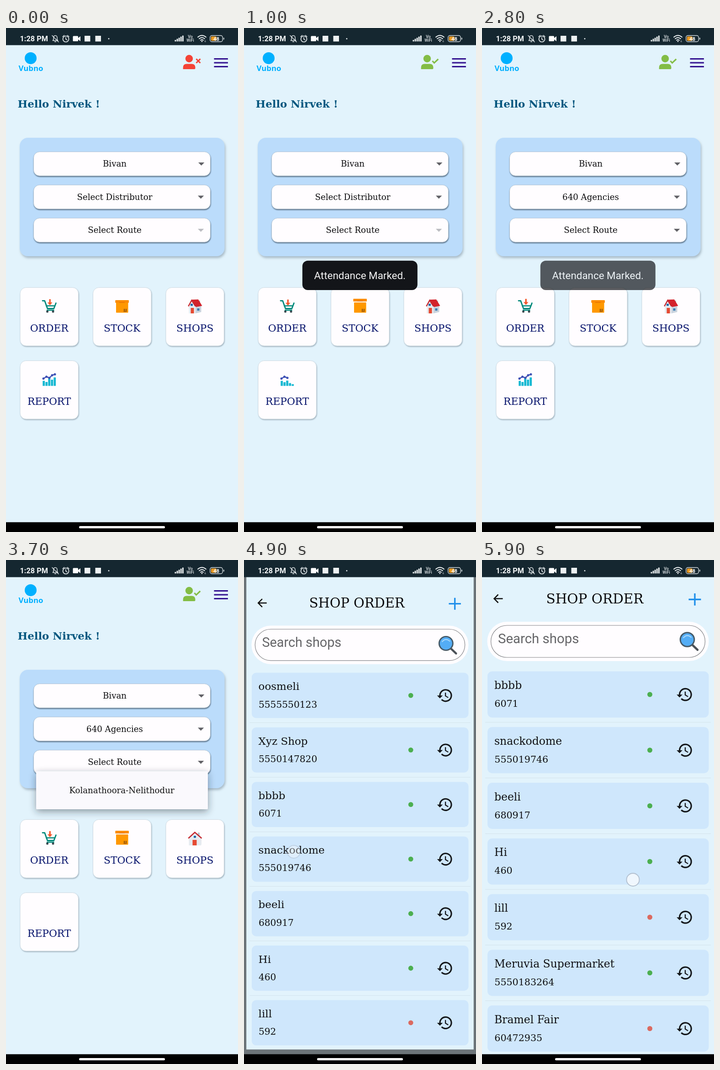
These frames come from a looping animation (508x1102 px, 6 s). An HTML page:

```html
<!DOCTYPE html>
<html lang="en">
<head>
<meta charset="utf-8">
<title>Shop order app</title>
<style>
  html, body { margin: 0; width: 100%; height: 100%; overflow: hidden; background: #e2f3fc; }
  svg { display: block; width: 508px; height: 1102px; }
  text { font-family: "DejaVu Serif", serif; }
  .sans { font-family: Roboto, sans-serif; }
  .mid { text-anchor: middle; }
  .line { fill: none; stroke-linecap: round; stroke-linejoin: round; }
  .sharp { stroke-linecap: butt; stroke-linejoin: miter; }
</style>
</head>
<body>
<svg id="stage" viewBox="0 0 508 1102" xmlns="http://www.w3.org/2000/svg"></svg>
<script>
const LOOP = 6000, STEP = 100, ICON_LOOP = 1500;
const ROUTE = 'Kolanathoora-Nelithodur', AGENCY = '640 Agencies';
const ROW_PITCH = 121.75, FIRST_ROW = 290.8, SCROLL = 240.3;
const PAGE_START = 4783, PAGE_TIME = 300, PAGE_END = 1081;

const shops = [
  ['oosmeli', '5555550123', 1], ['Xyz Shop', '5550147820', 1], ['bbbb', '6071', 1],
  ['snackodome', '555019746', 1], ['beeli', '680917', 1], ['Hi', '460', 1],
  ['lill', '592', 0], ['Meruvia Supermarket', '5550183264', 1], ['Bramel Fair', '60472935', 0]
];
const menus = [
  { top: 390, label: AGENCY, open: 1882, close: 2480 },
  { top: 462, label: ROUTE, open: 3430, close: 4080 }
];
// start, end, x, y
const taps = [
  [400, 570, 407, 76], [1700, 1930, 397, 377], [2300, 2450, 262, 434],
  [3260, 3420, 385, 446], [3920, 4060, 262, 506], [4610, 4800, 109, 638]
];
const drag = { from: 5400, move: 5450, to: 5880 };

const clamp = v => Math.max(0, Math.min(1, v));
const ramp = (t, a, b) => clamp((t - a) / (b - a));
const smooth = v => v * v * (3 - 2 * v);
const lerp = (a, b, k) => a + (b - a) * k;
const zoomAbout = s => `translate(254 551) scale(${s}) translate(-254 -551)`;

const rect = (x, y, w, h, r, fill, more = '') =>
  `<rect x="${x}" y="${y}" width="${w}" height="${h}" rx="${r}" fill="${fill}" ${more}/>`;
const circle = (x, y, r, fill, more = '') =>
  `<circle cx="${x}" cy="${y}" r="${r}" fill="${fill}" ${more}/>`;
const path = (d, fill, more = '') => `<path d="${d}" fill="${fill}" ${more}/>`;
const line = (d, color, w, cls = '') =>
  `<path class="line ${cls}" d="${d}" stroke="${color}" stroke-width="${w}"/>`;
const text = (s, x, y, size, fill, cls = '', more = '') =>
  `<text x="${x}" y="${y}" font-size="${size}" fill="${fill}" class="${cls}" ${more}>${s}</text>`;

const shadow = (id, dx, dy, blur, color, alpha) =>
  `<filter id="${id}" x="-20%" y="-40%" width="140%" height="200%">
    <feDropShadow dx="${dx}" dy="${dy}" stdDeviation="${blur}" flood-color="${color}" flood-opacity="${alpha}"/>
  </filter>`;

function field(i, label) {
  const y = 270.7 + i * 72.5, x = i ? 420 : 421;
  return rect(60.5, y, 387, 52.5, 13, '#fffdff', 'filter="url(#fieldShade)" stroke="#9fb3c4" stroke-width=".7"') +
    text(label, 238, y + 32.3, 18.2, '#0c0c0e', 'mid', `id="field${i}"`) +
    path(`M${x} ${y + 23.3}h13.4l-6.7 6.7z`, '#616166', `id="caret${i}"`);
}

function card(x, y, label) {
  return rect(x, y, 127.5, 127.5, 13, '#fffdff', 'filter="url(#cardShade)" stroke="#c3d2da" stroke-width=".7"') +
    text(label, x + 63.7, y + 96.8, 21.8, '#05126b', 'mid');
}

const cart = line('M80 596.3h4.6l6.2 17.2h14l4.6-12', '#00897b', 2.8) +
  line('M88 607.5h18.5M90 617h14.5', '#00897b', 2.4) +
  circle(90.5, 620, 2.5, '#37474f') + circle(103, 620, 2.5, '#37474f') +
  `<g id="arrow">${path('M94.5 -7h3.4v7h3.6l-5.3 6.3l-5.3 -6.3h3.6z', '#f4572b')}</g>`;

const box = rect(241, 600, 26.5, 22.5, 1, '#ff9800') +
  `<g id="lid">${rect(239.3, 595, 29.6, 6, 1, '#fb8c00')}${rect(248, 599.5, 12, 1.5, 0, '#e57300')}</g>` +
  path('M258.2 614h1.6v5h-1.6zM262 614h1.6v5h-1.6zM257.4 619.2h7v1h-7z', '#6d3b12');

const chartX = [82, 88.5, 95, 101, 107], chartY = [766.5, 762.5, 765, 759.3, 757.3];
const barFull = [11, 8.5, 16.5, 13.5, 18.5];
const chart = barFull.map((h, i) => rect(80.3 + i * 6, 0, 4.8, 0, 0, '#16b8d2', `id="bar${i}"`)).join('') +
  `<path id="trend" class="line sharp" pathLength="1" stroke="#3f51b5" stroke-width="2.5" d="M${chartX.map((x, i) => x + ' ' + chartY[i]).join('L')}"/>` +
  chartX.map((x, i) => circle(x, chartY[i], 2.5, '#3f51b5', `id="dot${i}"`)).join('');

const home = `<g id="home">
  ${rect(0, 0, 508, 1102, 0, '#e2f3fc')}
  ${circle(54, 66, 13, '#00b0ff')}
  ${text('Vubno', 54.5, 94, 16.8, '#00b0ff', 'mid', 'style="font-family:\'Open Sans\',sans-serif" font-weight="700"')}
  <g id="person">${circle(401, 67, 8.2, 'currentColor')}
    ${path('M387.7 90v-3.5q0-8 8-8h10.8q8 0 8 8v1.5q0 2-2 2z', 'currentColor')}
    <path id="mark" fill="none" stroke="currentColor" stroke-width="3.1"/></g>
  ${[66, 74.5, 83].map(y => rect(455.5, y, 30.5, 3, .5, '#32108f')).join('')}
  ${text('Hello Nirvek !', 25.5, 174, 22.9, '#04577f', '', 'font-weight="700"')}
  ${rect(30, 240, 448.5, 259, 18, '#bbdcfb', 'filter="url(#panelShade)"')}
  ${field(0, 'Bivan')}${field(1, '')}${field(2, '')}
  ${card(31, 567.5, 'ORDER')}${card(190.5, 567.5, 'STOCK')}${card(350, 567.5, 'SHOPS')}${card(31, 727.5, 'REPORT')}
  ${cart}${box}<g id="house"></g>${chart}
  <g id="menu"><rect id="menuBox" x="66" width="376" rx="2" fill="#faf9fd" filter="url(#menuShade)"/>
    <text id="menuText" class="mid" x="253.5" font-size="18.2" fill="#111"></text></g>
</g>`;

const history = 'M13 3a9 9 0 0 0-9 9H1l3.9 3.9.1.1L9 12H6a7 7 0 1 1 2.06 4.94l-1.42 1.42A9 9 0 1 0 13 3zm-1 5v5l4.28 2.54.72-1.21-3.5-2.08V8z';
function shopRow([name, phone, open], i) {
  return `<g transform="translate(0 ${FIRST_ROW + i * ROW_PITCH})">
    ${rect(12, -50.5, 484.5, 101, 10, '#cfe7fc')}
    ${text(name, 27, -12, 23.5, '#101113')}${text(phone, 27.3, 27, 20.6, '#101113')}
    ${circle(367.5, 0, 5.5, open ? '#4caf50' : '#db6a60')}
    ${path(history, '#15181b', 'transform="translate(424.6 -19) scale(1.6)"')}
    ${rect(7, 60.4, 494, 1, 0, '#d3e3ec')}</g>`;
}

const shop = `<g id="shop">
  ${rect(0, 0, 508, PAGE_END, 0, '#e2f3fc')}
  <g clip-path="url(#listClip)"><g id="list">${shops.map(shopRow).join('')}</g></g>
  ${line('M45.5 84.5H27M35.5 75.5l-9 9 9 9', '#111', 2.5, 'sharp')}
  ${text('SHOP ORDER', 247, 95, 29.5, '#0b0b0d', 'mid')}
  ${path('M452.5 84.5h11.8V73h3.4v11.5h11.8v3.4h-11.8v11.6h-3.4V87.9h-11.8z', '#2190ea')}
  ${rect(11.5, 135, 485, 86, 43, '#fffdff')}
  ${rect(19.5, 143, 469, 70, 35, 'none', 'stroke="#85868a" stroke-width="1.2"')}
  ${text('Search shops', 35, 182.3, 29.4, '#666669', 'sans')}
  <g id="lens">${line('M461 186l11 10.5', '#4b5157', 4.6)}
    ${circle(449.5, 174, 15.3, '#54adf5', 'stroke="#465a68" stroke-width="3"')}
    ${line('M441 170q8-9 17-1', '#a8d8fb', 2.2)}</g>
</g>`;

const status = rect(0, 0, 508, 37.5, 0, '#152730') +
  text('1:28 PM', 30.5, 29, 16.3, '#f2f5f6', 'sans', 'font-weight="700"') +
  line('M102.5 27.5h11l-1.5-2.5v-4a4 4.6 0 0 0-8 0v4zM106.5 30h3M101 16.5l14 14', '#dfe5e7', 1.5) +
  line('M131 17.5a6.5 6.5 0 1 0 .1 0M131 20.5v4l2.6 1.5M124 19l3.5-3M138 19l-3.5-3', '#dfe5e7', 1.6) +
  rect(146.5, 17.5, 11.5, 11.5, 1.5, '#fff') + path('M158 22l5-4v11l-5-4z', '#fff') +
  rect(172, 17, 12.5, 12.5, 0, '#edf1f2') + rect(195.5, 17, 12.5, 12.5, 0, '#edf1f2') +
  circle(225, 23.5, 1.4, '#e5eaec') +
  [0, 1, 2, 3, 4].map(i => rect(369.5 + i * 4.1, 26 - i * 2.4, 2.9, 3.5 + i * 2.4, .8, '#eef2f3')).join('') +
  text('Vo', 403.5, 21.5, 9, '#e8edef', 'sans mid', 'font-weight="500"') +
  text('WiFi', 403.5, 30, 8.5, '#e8edef', 'sans mid', 'font-weight="500"') +
  line('M420 20q9-7.5 18 0M423 23.5q6-5 12 0M426 26.8q3-2.5 6 0', '#eef2f3', 1.9) +
  circle(429, 29.2, 1.4, '#eef2f3') + text('6', 434.5, 31, 6, '#dfe5e7', 'sans') +
  rect(446.8, 16.5, 27.5, 13.5, 4, 'none', 'stroke="#d5dcdf" stroke-width="1.4"') +
  rect(448.8, 18.5, 12, 9.5, 2, '#e99a22') + rect(476, 21, 1.8, 4.5, .9, '#d5dcdf') +
  text('48', 460.5, 27.5, 11.5, '#fff', 'sans mid', 'font-weight="700"');

document.getElementById('stage').innerHTML = `<defs>
  ${shadow('panelShade', 2, 4, 2.6, '#6f8494', .5)}
  ${shadow('fieldShade', .6, 2, 1.3, '#30475a', .75)}
  ${shadow('cardShade', 1, 1.8, 1.3, '#5b717e', .5)}
  ${shadow('menuShade', 0, 5, 8, '#222b35', .46)}
  <clipPath id="listClip">${rect(0, 237, 508, PAGE_END - 237, 0, '#000')}</clipPath></defs>
  ${home}
  <rect id="scrim" width="508" height="1102"/>
  ${shop}
  <g id="toast">${rect(127.8, 508.8, 252, 64.2, 12, '#131519')}
    ${text('Attendance Marked.', 253.7, 549, 22.4, '#f4f4f5', 'sans mid')}</g>
  ${circle(0, 0, 14, '#fff', 'id="touch" fill-opacity=".68" stroke="#b3c0d0" stroke-width="1.9"')}
  ${status}
  ${rect(0, 1080.6, 508, 22, 0, '#000')}${rect(160, 1089, 188, 5, 2.5, '#fff')}`;

const parts = {};
document.querySelectorAll('#stage [id]').forEach(n => parts[n.id] = n);
const set = (id, attrs) => {
  for (const k in attrs) parts[id].setAttribute(k, attrs[k]);
};

// turn 0 faces the viewer, 1 shows the right-hand wall
function drawHouse(turn) {
  const peak = lerp(413.5, 406.5, turn), corner = lerp(427, 414.5, turn);
  const back = lerp(peak, 421, turn), right = lerp(429.5, 416, turn);
  const door = lerp(408.5, 404.5, turn), doorW = lerp(9, 7, turn);
  parts.house.innerHTML =
    rect(lerp(420, 421, turn), 596, 4, 9, 0, '#b9c2cc') +
    path(`M${corner} 607H427.5V621L${corner} 624z`, '#c9d3de') +
    path(`M400.5 608L${peak} 597L${corner} 608V624H400.5z`, '#e6ebf0') +
    path(`M${peak} 594L${back} 593.5L429.5 607.5L${right} 610z`, '#d3232c', `opacity="${turn}"`) +
    line(`M399.3 608.5L${peak} 595.5L${right - 1} 608.5`, '#c62830', 2.5, 'sharp') +
    rect(door, 612, doorW, 12, 0, '#e64a32') +
    rect(peak - 2.4, 603, 4.8, 4.5, 0, '#1565a8') +
    (turn > .5 ? rect(418.5, 613, 5, 5, 0, '#3c7fb5') : '');
}

function drawIcons(t) {
  const p = t % ICON_LOOP;
  const up = p > 250 && p < 550;
  const bob = Math.sin(p / ICON_LOOP * Math.PI * 4);
  set('arrow', { transform: `translate(0 ${600 + bob * .8}) scale(1 ${up ? -1 : 1})` });

  const lift = smooth(ramp(p, 100, 350)) * (1 - smooth(ramp(p, 1000, 1250)));
  set('lid', { transform: `translate(0 ${-3 * lift})` });

  drawHouse(1 - smooth(ramp(p, 150, 350)) + smooth(ramp(p, 780, 960)));

  const sway = Math.sin((p + 100) / ICON_LOOP * Math.PI) ** 2;
  set('lens', { transform: `translate(${-4.4 * sway} ${sway})` });

  const growing = p >= 850;
  const grown = growing ? ramp(p, 850, 1150) : 1;
  const gone = growing ? 0 : ramp(p, 200, 600);
  set('trend', { 'stroke-dasharray': `0 ${gone} ${grown - gone} 2`, opacity: grown > gone ? 1 : 0 });
  barFull.forEach((full, i) => {
    const h = full * clamp(grown * 2.4 - i * .25) * (1 - clamp(gone * 2 - i * .25));
    set('bar' + i, { y: 782.5 - h, height: h });
    set('dot' + i, { opacity: i / 4 >= gone && i / 4 <= grown && grown > gone ? 1 : 0 });
  });
}

function drawMenu(t) {
  const m = menus.find(m => t >= m.open && t < m.close + 75);
  set('menu', { opacity: m ? ramp(t, m.open, m.open + 75) * (1 - ramp(t, m.close, m.close + 75)) : 0 });
  if (!m) return;
  set('menuBox', { y: m.top, height: lerp(62, 83, ramp(t, m.open + 75, m.open + 150)) });
  set('menuText', { y: m.top + 48, opacity: ramp(t, m.open + 100, m.open + 220) });
  parts.menuText.textContent = m.label;
}

function drawTouch(t) {
  const tap = taps.find(([a, b]) => t >= a && t < b + 200);
  if (t >= drag.from) {
    const k = smooth(ramp(t, drag.move, drag.to));
    set('touch', { cx: lerp(318, 330.5, k), cy: lerp(699 + SCROLL, 699, k), opacity: 1 });
  } else if (tap) {
    set('touch', { cx: tap[2], cy: tap[3], opacity: 1 - ramp(t, tap[1], tap[1] + 200) });
  } else set('touch', { opacity: 0 });
}

function drawPages(t) {
  const p = ramp(t, PAGE_START, PAGE_START + PAGE_TIME);
  const zoom = p < 1 / 6 ? .4 * (p * 6) ** 3 : 1 - .6 * (1 - clamp((p - 1 / 6) * 1.2)) ** 4.78;
  set('home', { transform: zoomAbout(lerp(1, 1.05, zoom)) });
  set('scrim', { opacity: .6 * ramp(p, .2075, .4175) });
  set('shop', { transform: zoomAbout(lerp(.85, 1, zoom)), opacity: ramp(p, .125, .25) });
  set('list', { transform: `translate(0 ${-SCROLL * smooth(ramp(t, drag.move, drag.to))})` });
}

function draw(t) {
  const marked = t >= 700, agency = t >= 2500, route = t >= 4100;
  parts.person.style.color = marked ? '#83bd45' : '#f44336';
  set('mark', { d: marked ? 'M412.5 72l4 4.3 8.8-8.3' : 'M416.5 67.5l9 9m0-9l-9 9' });
  parts.field1.textContent = agency ? AGENCY : 'Select Distributor';
  parts.field2.textContent = route ? ROUTE : 'Select Route';
  set('caret2', { fill: agency ? '#616166' : '#bcbdc2' });
  set('toast', { opacity: ramp(t, 740, 900) * (1 - ramp(t, 2700, 3000)) ** .9 });
  drawIcons(t);
  drawMenu(t);
  drawTouch(t);
  drawPages(t);
}

// The picture advances in tenths of a second.
function tick() {
  draw(Math.floor((performance.now() + 20) % LOOP / STEP) * STEP);
  requestAnimationFrame(tick);
}
tick();
</script>
</body>
</html>
```
